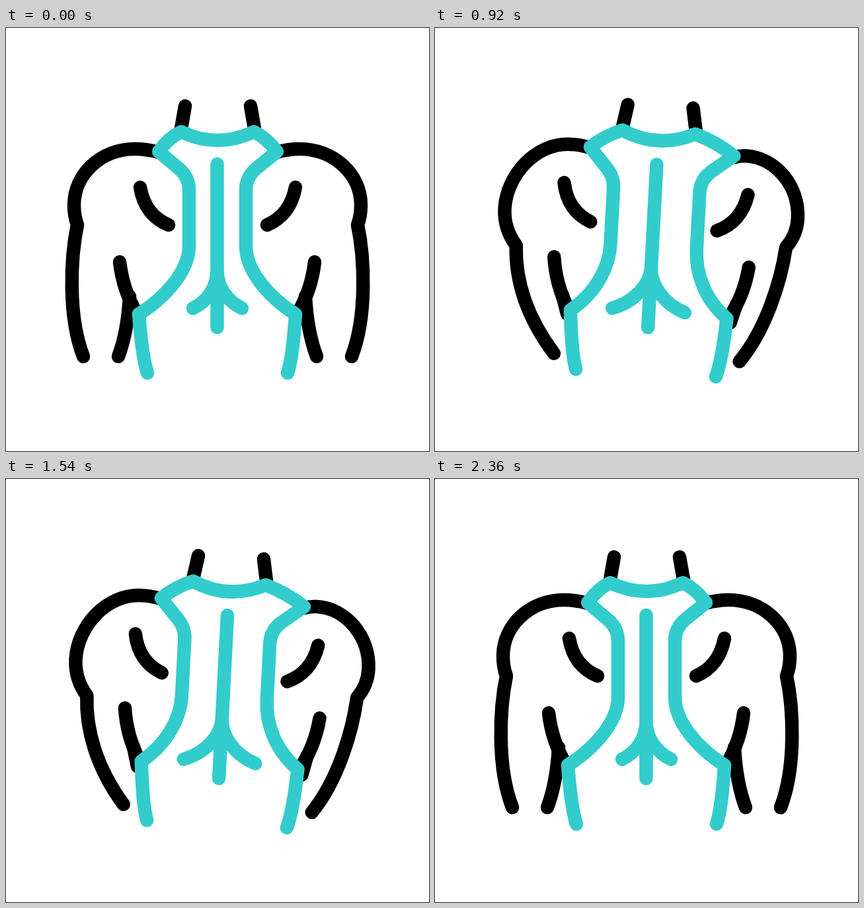
These frames come from a looping animation (640 by 640 pixels, 2.4 s). An HTML page with a canvas:

```html
<!DOCTYPE html>
<html lang="en">
<head>
<meta charset="utf-8">
<title>Back stretch</title>
<style>
  html, body { margin: 0; width: 100%; height: 100%; overflow: hidden; background: #fff; }
  canvas { display: block; width: 100vmin; height: 100vmin; }
</style>
</head>
<body>
<canvas id="stage" width="640" height="640"></canvas>
<script>
const ctx = document.getElementById('stage').getContext('2d');
const LOOP = 2400, STEP = 20;
const BLACK = '#000', TEAL = '#33cccc';
const PIVOT = { x: 320, y: 503 };

// Each part: colour, relaxed path, flexed path (omitted when it keeps its shape).
const parts = [
  // neck
  [BLACK, 'M271 118 L265 152 M370 118 L376 152'],
  // shoulders and arms
  [BLACK,
    'M231 188 Q212 183 195 183 C143 183 103 222 103 268 Q103 284 108 298 C98 345 93 435 117 497',
    'M217 186 Q200 182 188 182.5 C135 182 93 235 93 286 Q93 317 114 342 C116 395 138 448 183 500'],
  [BLACK,
    'M409 188 Q428 183 444 183 C497 183 537 222 537 268 Q537 284 532 298 C542 345 547 435 523 497',
    'M437 189 Q445 186 454 186 C499 186 537 228 537 277 Q537 302 521 322 C515 375 495 448 457 497'],
  // shoulder blades
  [BLACK,
    'M203 241 Q210 283 246 298 M438 241 Q430 283 395 298',
    'M180 241 Q187 283 223 298 M461 244.5 Q453 286.5 417 301.5'],
  // ribs
  [BLACK, 'M172 354 Q177 397 198 432 M467 354 Q462 397 441 432'],
  // inner forearms
  [BLACK,
    'M187 406 Q184 460 170 497 M453 406 Q456 460 470 497',
    'M188 412 Q192 422 198 436 M451 412 Q447 422 442 436'],
  // back outline
  [TEAL,
    'M214 522 Q206 498 201 433 C245 405 277 365 277 330 L277 245 Q277 226 262 213 L231 187 Q246 166 265 157' +
    ' Q320 183 375 157 Q394 166 410 187 L378 213 Q363 226 363 245 L363 330 C363 365 394 405 438 433 Q434 498 426 522',
    'M214 522 Q206 498 201 433 C238 405 255 365 255 330 L255 245 Q255 228 242 214 L217 185 Q238 167 265 157' +
    ' Q320 183 375 157 Q410 168 437 187 L403 213 Q388 226 388 245 L388 330 C388 365 402 405 438 433 Q434 498 426 522'],
  // spine
  [TEAL,
    'M319.5 206 L319.5 453 M283 424 C304 414 319.5 393 319.5 366 C319.5 393 336 414 357 424',
    'M319.5 206 L319.5 453 M263 427 C298 415 319.5 387 319.5 362 C319.5 387 341 416 375 428']
];

// Sway keys: time in ms, tilt in degrees.
const sway = [[0, 0], [430, 0], [695, -4.3], [990, 4.3], [1170, -2.1], [1495, 3.2], [1775, 0], [LOOP, 0]];

const smooth = x => x * x * (3 - 2 * x);

// Cubic bezier easing (.7, 0, .3, 1), solved by bisection.
function ease(x) {
  let lo = 0, hi = 1;
  for (let i = 0; i < 24; i++) {
    const s = (lo + hi) / 2, r = 1 - s;
    if (2.1 * s * r * r + 0.9 * s * s * r + s * s * s < x) lo = s; else hi = s;
  }
  return smooth(lo);
}

function tiltAt(t) {
  const i = sway.findIndex(key => key[0] > t);
  const [t0, a] = sway[i - 1], [t1, b] = sway[i];
  return a + (b - a) * smooth((t - t0) / (t1 - t0));
}

function blend(from, to, k) {
  const number = /[\d.]+/g;
  const ends = to.match(number);
  let i = 0;
  return from.replace(number, n => (+n + (ends[i++] - n) * k).toFixed(3));
}

function draw(t) {
  const flex = ease(1 - Math.abs(t / (LOOP / 2) - 1));
  ctx.setTransform(1, 0, 0, 1, 0, 0);
  ctx.fillStyle = '#fff';
  ctx.fillRect(0, 0, 640, 640);
  ctx.translate(PIVOT.x, PIVOT.y);
  ctx.rotate(tiltAt(t) * Math.PI / 180);
  ctx.translate(-PIVOT.x, -PIVOT.y);
  ctx.lineWidth = 20.5;
  ctx.lineCap = ctx.lineJoin = 'round';
  for (const [color, relaxed, flexed = relaxed] of parts) {
    ctx.strokeStyle = color;
    ctx.stroke(new Path2D(blend(relaxed, flexed, flex)));
  }
}

const start = performance.now();
function frame() {
  const t = (performance.now() - start) % LOOP;
  draw(Math.floor(t / STEP) * STEP);
  requestAnimationFrame(frame);
}
frame();
</script>
</body>
</html>
```
